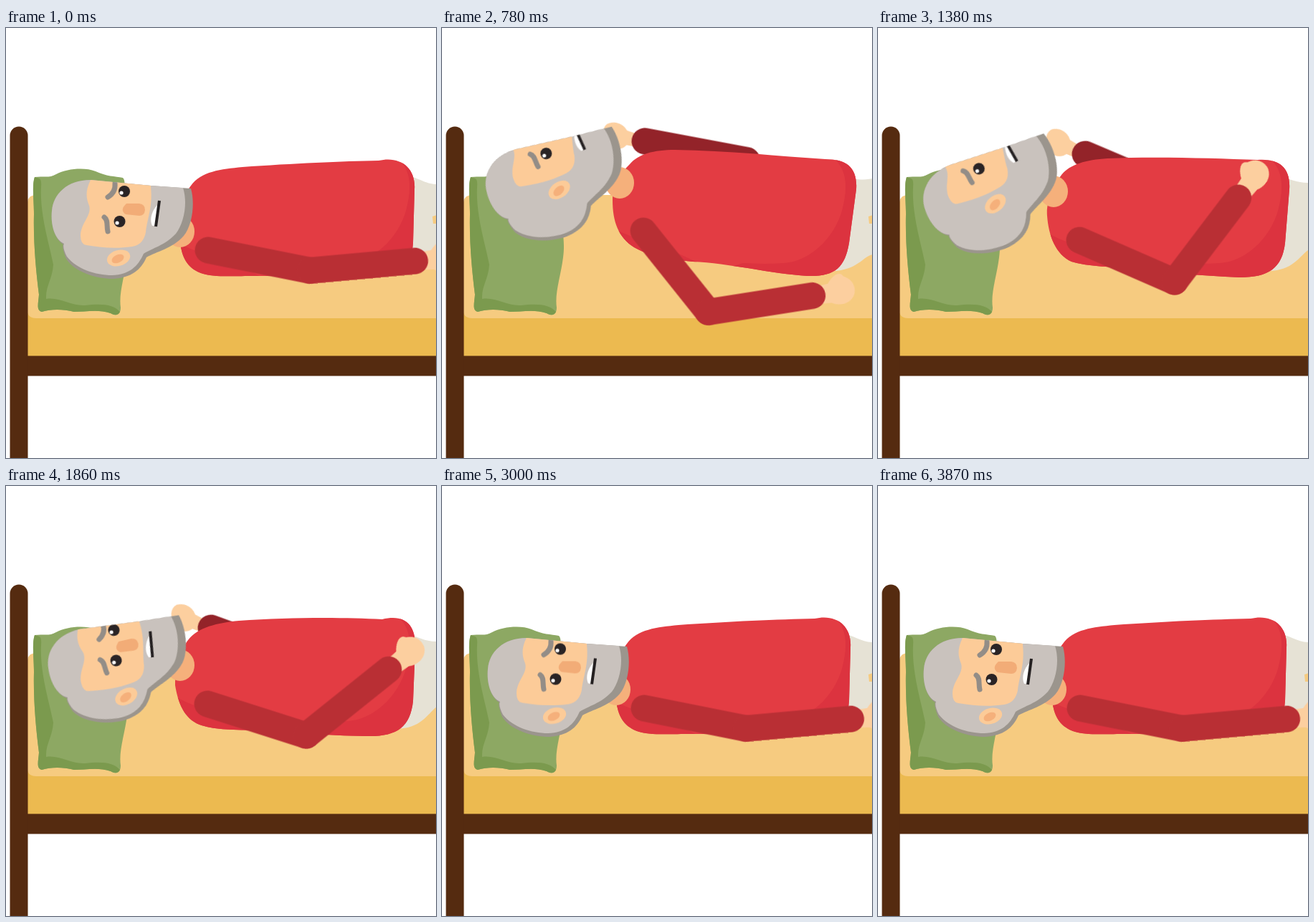
Animation of 600 by 600 pixels, one loop 4.23 s. Source, as an HTML page without scripts:

```html
<!DOCTYPE html>
<html lang="en">
<head>
<meta charset="utf-8">
<title>Getting up from bed</title>
<style>
  :root {
    --up: cubic-bezier(.4, 0, .5, 1);
    --lean: cubic-bezier(.4, 0, .8, .6);
    --turn: cubic-bezier(.4, .25, .7, .75);
    --settle: cubic-bezier(.3, .35, .5, 1);
    --skin: #fccb98;
    --flesh: #f5b07b;
    --wood: #552b10;
  }
  html, body { margin: 0; height: 100%; overflow: hidden; background: #fff; }
  svg { display: block; width: 100%; height: 100%; }

  .torso, .pants, .gap, .fold, .neck, .far, .head, .look, .nose, .mouth, .ear, .arm, .fore {
    animation: 4230ms linear infinite;
  }
  .torso { animation-name: torso; }
  .pants { animation-name: pants; }
  .gap { animation-name: gap; }
  .fold { animation-name: fold; }
  .neck { animation-name: neck; }
  .far { animation-name: far; }
  .head { animation-name: head; transform-origin: 118px 212px; }
  .look { animation-name: look; }
  .nose { animation-name: nose; }
  .mouth { animation-name: mouth; transform-origin: 210px 259px; }
  .ear { animation-name: ear; }
  .arm { animation-name: arm; }
  .fore { animation-name: fore; }

  /* poses: lying, raised, leaning back, turning, lying */
  @keyframes torso {
    0% {
      d: path("M243 300C236 270 248 232 258 220C272 200 300 197 330 194C400 189 470 186 520 185C550 178 572 195 570 225L568 300C566 335 540 349 500 349C440 349 400 346 350 346C310 346 290 348 272 342C252 334 246 320 243 300Z");
      animation-timing-function: var(--up);
    }
    18.44% {
      d: path("M238 240C238 215 252 200 262 190C274 176 295 170 325 170C400 171 470 179 535 183C565 183 580 195 578 225L568 300C562 335 548 347 510 346C460 343 400 328 350 326C310 322 285 316 268 306C246 292 238 270 238 240Z");
      animation-timing-function: var(--lean);
    }
    32.62% {
      d: path("M236 262C234 240 248 215 256 205C268 190 290 184 320 182C390 179 470 182 530 184C560 182 576 195 574 225L568 300C564 335 545 348 505 348C450 346 400 340 350 336C310 332 290 332 270 326C248 316 238 290 236 262Z");
      animation-timing-function: var(--turn);
    }
    43.97% {
      d: path("M236 278C236 250 246 225 254 215C268 197 295 191 325 188C395 183 470 183 525 186C558 178 572 195 571 225L568 300C564 337 545 350 503 349C445 348 400 344 350 341C310 340 290 340 270 333C248 324 240 302 236 278Z");
      animation-timing-function: var(--settle);
    }
    53.9%, 100% {
      d: path("M243 300C236 270 248 232 258 220C272 200 300 197 330 194C400 189 470 186 520 185C550 178 572 195 570 225L568 300C566 335 540 349 500 349C440 349 400 346 350 346C310 346 290 348 272 342C252 334 246 320 243 300Z");
    }
  }
  @keyframes pants {
    0%, 57.4%, 100% {
      d: path("M555 205C575 208 585 218 601 218V308C585 312 575 325 545 336Z");
      animation-timing-function: var(--up);
    }
    18.44% {
      d: path("M560 205C575 213 585 212 601 210V316C588 318 580 338 545 339Z");
      animation-timing-function: var(--lean);
    }
    43.97% {
      d: path("M558 205C575 211 585 217 601 217V308C588 318 580 338 545 339Z");
    }
  }
  @keyframes gap {
    0%, 18.44%, 57.4%, 100% { transform: none; }
    32.62%, 43.97% { transform: translateX(6px); }
  }
  @keyframes fold {
    0%, 53.9%, 100% { transform: none; }
    18.44% { transform: translateY(-20px); }
    32.62% { transform: translateY(-12px); }
    43.97% { transform: translateY(-4px); }
  }
  @keyframes neck {
    0% { transform: translate(243px, 284px); animation-timing-function: var(--up); }
    18.44% { transform: translate(248px, 216px); animation-timing-function: var(--lean); }
    32.62% { transform: translate(245px, 228px); animation-timing-function: var(--turn); }
    43.97% { transform: translate(243px, 250px); animation-timing-function: var(--settle); }
    53.9%, 100% { transform: translate(243px, 284px); }
  }
  @keyframes far {
    0% { transform: translate(330px, 250px) rotate(8deg); animation-timing-function: var(--up); }
    18.44% { transform: translate(283px, 158px) rotate(10.6deg); animation-timing-function: ease-out; }
    22% { transform: translate(282px, 153px) rotate(12deg); animation-timing-function: ease-in; }
    32.62% { transform: translate(289px, 176px) rotate(23deg); animation-timing-function: var(--turn); }
    43.97% { transform: translate(286px, 198px) rotate(20deg); animation-timing-function: var(--settle); }
    53.9%, 100% { transform: translate(330px, 250px) rotate(8deg); }
  }
  @keyframes head {
    0% { transform: none; animation-timing-function: var(--up); }
    18.44% { transform: translate(-18px, -42px) rotate(-18.2deg); animation-timing-function: var(--lean); }
    32.62% { transform: translate(-20px, -20px) rotate(-23.5deg); animation-timing-function: var(--turn); }
    43.97% { transform: translate(-16px, -12px) rotate(-13deg); animation-timing-function: var(--settle); }
    53.9%, 100% { transform: none; }
  }
  @keyframes look {
    0% { transform: none; animation-timing-function: var(--up); }
    18.44% { transform: translate(1px, -39px); animation-timing-function: var(--lean); }
    32.62% { transform: translate(-3px, -37px); animation-timing-function: var(--turn); }
    43.97% { transform: translate(0, -4px); animation-timing-function: var(--settle); }
    53.9% { transform: translate(0, -1px); }
    91.5%, 100% { transform: none; }
  }
  @keyframes nose {
    0%, 43.97%, 100% { transform: none; }
    18.44%, 32.62% { transform: translateY(-18px); }
  }
  @keyframes mouth {
    0%, 43.97%, 100% { transform: none; }
    18.44%, 32.62% { transform: translate(-2px, 5px) rotate(-14deg); }
  }
  @keyframes ear {
    0%, 53.9%, 100% { transform: none; }
    18.44%, 32.62% { transform: translate(3px, 3px); }
    43.97% { transform: translate(4px, 1px); }
  }
  @keyframes arm {
    0% { transform: translate(282px, 310px) rotate(11.3deg); animation-timing-function: var(--up); }
    18.44% { transform: translate(281px, 283px) rotate(51.4deg); animation-timing-function: cubic-bezier(.3, .1, .7, .8); }
    32.62% { transform: translate(281px, 296px) rotate(23.6deg); animation-timing-function: cubic-bezier(.3, .5, .7, .8); }
    43.97% { transform: translate(281px, 304px) rotate(17.7deg); animation-timing-function: var(--settle); }
    53.9% { transform: translate(282px, 310px) rotate(11.9deg); }
    57.4%, 100% { transform: translate(282px, 310px) rotate(11.3deg); }
  }
  @keyframes fore {
    0% { transform: translateX(145px) rotate(-16.5deg); animation-timing-function: var(--up); }
    18.44% { transform: translateX(145px) rotate(-60.3deg); animation-timing-function: cubic-bezier(.3, .1, .6, .9); }
    32.62% { transform: translateX(145px) rotate(-76.4deg); animation-timing-function: cubic-bezier(.4, .2, .7, .7); }
    43.97% { transform: translateX(145px) rotate(-56.5deg); animation-timing-function: cubic-bezier(.3, .35, .6, .9); }
    53.9% { transform: translateX(145px) rotate(-22.5deg); animation-timing-function: ease-out; }
    57.4%, 100% { transform: translateX(145px) rotate(-16.5deg); }
  }
</style>
</head>
<body>
<svg viewBox="0 0 600 600" fill="none">
  <defs>
    <clipPath id="shirt"><path class="torso"/></clipPath>
    <path id="hair" d="M118 212L202 220L258 224C264 245 260 275 248 290C232 308 210 312 196 320C188 338 175 348 150 350C125 350 95 340 84 322C80 312 78 303 80 302C68 295 62 275 64 255C66 232 85 212 118 212Z"/>
    <clipPath id="skull"><use href="#hair"/></clipPath>
  </defs>

  <!-- bed -->
  <path fill="#f6cb80" d="M30 243Q31 233 42 233H600V406H30Z"/>
  <path fill="#ecba50" d="M30 397Q32 405 42 405H600V459H30Z"/>
  <path fill="var(--wood)" d="M30 457.5H600V485.5H30Z"/>
  <path fill="var(--wood)" d="M5.5 150a12.5 12.5 0 0 1 25 0V600H5.5Z"/>

  <!-- pillow -->
  <path fill="#8da863" d="M40 208C52 206 60 210 70 204C85 196 110 194 125 200C140 207 152 207 163 209C168 214 164 225 164 235C164 270 173 290 169 320C166 345 157 370 160 390C160 402 152 402 146 398C130 392 110 396 95 396C80 392 62 392 50 396C42 394 45 385 46 372C42 340 38 300 39 260C39 240 36 220 40 208Z"/>
  <path fill="#7b9a4e" d="M40 208C47 211 50 208 49 222C47 260 60 300 66 330C65 350 55 360 56 378C75 375 90 388 110 387C135 384 150 386 159 396C156 402 150 400 146 398C130 392 110 396 95 396C80 392 62 392 50 396C42 394 45 385 46 372C42 340 38 300 39 260C39 240 36 220 40 208Z"/>

  <!-- far arm -->
  <g class="far">
    <path fill="#fccf9f" d="M-12 10L-24 10C-30 20 -44 21 -50 11C-61 4 -62 -8 -56 -14C-46 -21 -34 -18 -27 -10L-12 -8Z"/>
    <path stroke="#932329" stroke-width="37" stroke-linecap="round" d="M0 0H145"/>
  </g>

  <!-- body -->
  <path class="pants" fill="#e6e2d5"/>
  <path class="gap" fill="#f6cb80" d="M595 263L601 261V273H596Z"/>
  <path class="torso" fill="#e33c43"/>
  <g clip-path="url(#shirt)" fill="#dc333f">
    <path d="M548 183C566 200 566 225 558 255C548 290 520 318 490 326C470 330 440 329 420 328L300 365H620V180Z"/>
    <path class="fold" d="M230 292C250 312 300 318 358 348L358 365H230Z"/>
  </g>
  <ellipse class="neck" rx="20" ry="22" fill="var(--flesh)"/>

  <!-- head -->
  <g class="head">
    <use href="#hair" fill="#9b958d"/>
    <path fill="#c9c2bd" d="M118 212L202 220L247 223C254 245 248 273 237 287C221 304 204 307 192 315C184 333 172 344 148 345C125 345 98 336 85 319C81 312 79 304 81 301C68 295 62 275 64 255C66 232 85 212 118 212Z"/>
    <g clip-path="url(#skull)">
      <g class="look">
        <path fill="var(--skin)" d="M118 150V212C110 228 112 238 116 248C120 262 104 272 104 290Q104 302 112 303C135 307 155 308 176 305C188 303 193 295 195 285C197 265 205 250 202 222V150Z"/>
        <g stroke="#938d87" stroke-width="7" stroke-linecap="round">
          <path d="M152 217C153 228 147 233 142 236"/>
          <path d="M137 264C143 268 140 277 142 284"/>
        </g>
        <g fill="#2a2425">
          <circle cx="165" cy="228" r="8"/>
          <circle cx="158.5" cy="270" r="8"/>
        </g>
        <g fill="#fff">
          <circle cx="161" cy="230" r="2.6"/>
          <circle cx="155" cy="272" r="2.6"/>
        </g>
        <path class="nose" fill="#f2ac77" d="M168 245H186Q194 246 194 254Q193 262 186 262L167 260Q158 254 168 245Z"/>
        <g class="mouth">
          <path fill="#fff" d="M213 245C203 255 200 267 204 276H210Z"/>
          <path stroke="#242021" stroke-width="4" d="M214 241L209 277"/>
        </g>
        <g class="ear">
          <ellipse cx="157" cy="321" rx="16.5" ry="11" transform="rotate(-16 157 321)" fill="var(--skin)"/>
          <ellipse cx="156" cy="322" rx="9" ry="5.5" transform="rotate(-24 156 322)" fill="var(--flesh)"/>
        </g>
      </g>
    </g>
  </g>

  <!-- near arm -->
  <g class="arm" stroke="#b92f34" stroke-width="37" stroke-linecap="round">
    <path d="M0 0H145"/>
    <g class="fore">
      <path fill="#fccf9f" stroke="none" d="M156 -12L171 -13C180 -25 190 -28 194 -20C204 -15 209 -6 206 5C202 18 184 22 172 14L156 13Z"/>
      <path d="M0 0H147"/>
    </g>
  </g>
</svg>
</body>
</html>
```
